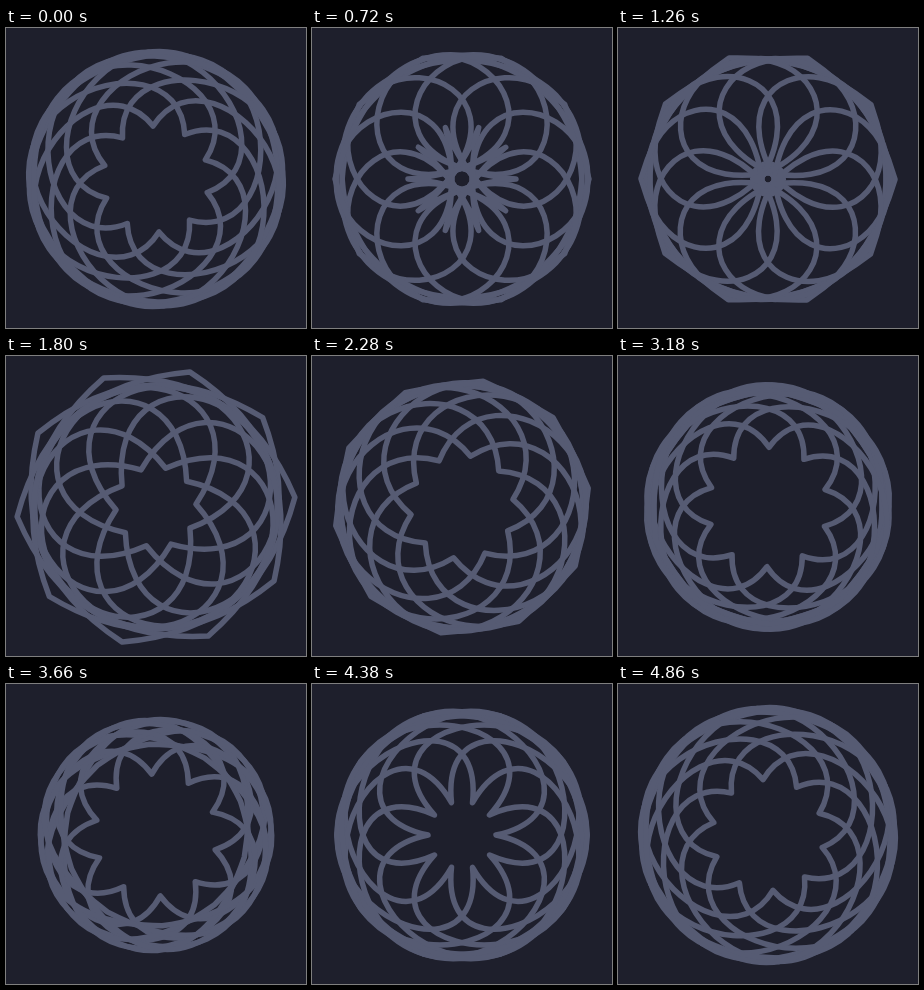
Recreate the animation shown at these times as an HTML page with a canvas. Size 300x300 px, loop 4920 ms.

```html
<!DOCTYPE html>
<html>
<head>
<meta charset="utf-8">
<style>
  html, body { margin: 0; width: 100%; height: 100%; overflow: hidden; background: #1e1f2c; }
  canvas { display: block; }
</style>
</head>
<body>
<canvas id="stage" width="300" height="300"></canvas>
<script>
const ctx = document.getElementById('stage').getContext('2d');
const STEP = 60, STEPS = 82, COPIES = 10;

// Each heart half is one Bezier curve from its dent to its point.
// Pose: step, then [turn in degrees, dent, first handle x, y, second handle x, y].
const poses = [
  [0, [14.8, 53, 147, 67, -74, 240]],
  [12, [36, -54, 177, 18, -50, 267]],
  [30, [32, 40, 131, 117, -71, 198]],
  [45, [23, 53, 147, 67, -74, 240]],
  [61, [14, 61, 164, 66, -74, 223]],
  [73, [0, 34, 185, 32, -60, 259]]
];

function pose(i) {
  const n = poses.length, lap = Math.floor(i / n);
  const [at, values] = poses[i - lap * n];
  return { at: at + lap * STEPS, values };
}

// Periodic cubic interpolation between the poses.
function poseAt(step) {
  const i = poses.findLastIndex(([at]) => at <= step);
  const [a, b, c, d] = [-1, 0, 1, 2].map(n => pose(i + n));
  const span = c.at - b.at, s = (step - b.at) / span;
  return b.values.map((v, j) => {
    const w = c.values[j];
    const m0 = (w - a.values[j]) / (c.at - a.at) * span;
    const m1 = (d.values[j] - v) / (d.at - b.at) * span;
    return v + s * (m0 + s * (3 * (w - v) - 2 * m0 - m1 + s * (2 * (v - w) + m0 + m1)));
  });
}

const pulse = (step, centre, width) => Math.exp(-(((step - centre) / width) ** 2));

function draw(now) {
  const step = Math.floor(now / STEP) % STEPS;
  const [turn, dent, x1, y1, x2, y2] = poseAt(step);
  const point = -127 - 13 * pulse(step, 31, 4) + 36 * pulse(step, 61, 7);

  const heart = new Path2D();
  heart.moveTo(dent, 0);
  heart.bezierCurveTo(x1, y1, x2, y2, point, 0);
  heart.bezierCurveTo(x2, -y2, x1, -y1, dent, 0);
  heart.closePath();

  ctx.setTransform(1, 0, 0, 1, 0, 0);
  ctx.fillStyle = '#1e1f2c';
  ctx.fillRect(0, 0, 300, 300);
  ctx.translate(150, 151);
  ctx.rotate(turn * Math.PI / 180);
  ctx.strokeStyle = '#565b73';
  ctx.lineWidth = 5.5;
  ctx.lineJoin = 'round';
  for (let i = 0; i < COPIES; i++) {
    ctx.stroke(heart);
    ctx.rotate(2 * Math.PI / COPIES);
  }
}

const start = performance.now();
function tick() {
  draw(performance.now() - start);
  requestAnimationFrame(tick);
}
tick();
</script>
</body>
</html>
```
